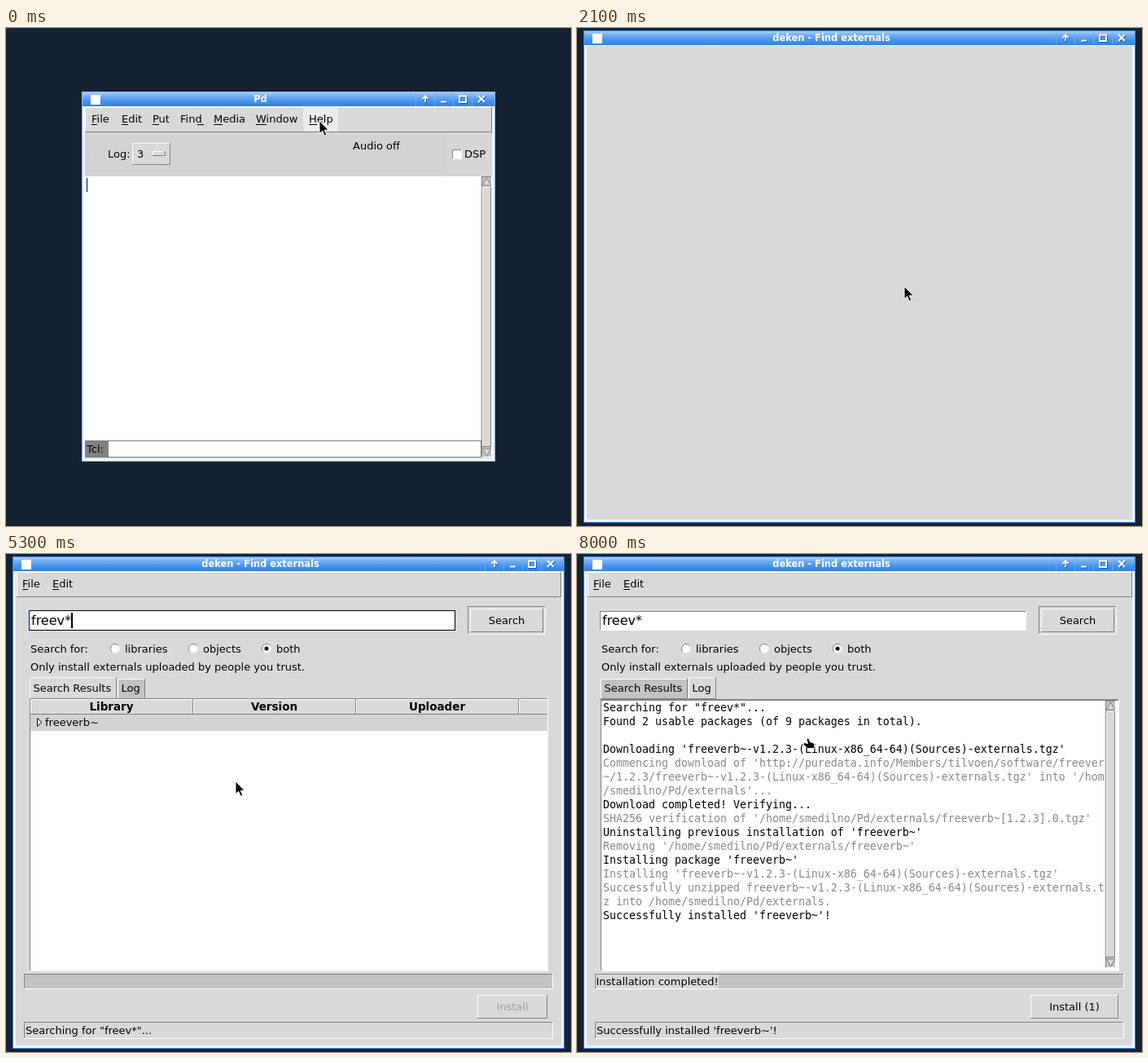
Write an HTML page that moves like this. It is 694 px wide and 611 px high and loops after 9400 ms.

```html
<!DOCTYPE html>
<html lang="en">
<head>
<meta charset="utf-8">
<title>Find externals</title>
<style>
html, body { margin: 0; width: 100%; height: 100%; overflow: hidden; background: #152233; }
svg { display: block; }
rect, .crisp { shape-rendering: crispEdges; }
text { font: 13px "DejaVu Sans", sans-serif; white-space: pre; }
text.bold { font-weight: bold; font-size: 13.5px; }
text.title { font-weight: bold; font-size: 11.45px; }
text.mono { font: 13.29px "DejaVu Sans Mono", monospace; }
text.entry { font-size: 16px; }
</style>
</head>
<body>
<svg id="stage" width="694" height="611" viewBox="0 0 694 611">
  <defs>
    <linearGradient id="bar" x2="0" y2="1">
      <stop offset="0" stop-color="#a9cef8"/>
      <stop offset=".3" stop-color="#6eacf3"/>
      <stop offset=".6" stop-color="#4c94ec"/>
      <stop offset="1" stop-color="#3381e3"/>
    </linearGradient>
  </defs>
  <g id="scene"></g>
</svg>
<script>
const LOOP = 9400, STEP = 100;
const BG = '#d9d9d9', TROUGH = '#c3c3c3', DARK = '#828282', GREY = '#888', LIT = '#ececec';
const scene = document.getElementById('scene');

// ---- drawing helpers ----
const esc = s => s.replace(/&/g, '&amp;').replace(/</g, '&lt;');
const box = (x, y, w, h, fill) =>
  `<rect x="${x}" y="${y}" width="${w}" height="${h}" fill="${fill}"/>`;
const text = (x, y, s, fill = '#000', cls = '', anchor = 'start') =>
  `<text x="${x}" y="${y}" fill="${fill}" class="${cls}" text-anchor="${anchor}">${esc(s)}</text>`;
const path = (d, fill, stroke = 'none', width = 1, extra = '') =>
  `<path d="${d}" fill="${fill}" stroke="${stroke}" stroke-width="${width}" ${extra}/>`;
const clip = (x, y, w, h, body) =>
  `<svg x="${x}" y="${y}" width="${w}" height="${h}" viewBox="${x} ${y} ${w} ${h}">${body}</svg>`;

function bevel(x, y, w, h, fill, sunken = false) {
  const [a, b] = sunken ? [DARK, '#fff'] : ['#fff', DARK];
  return box(x, y, w, h, b) + box(x, y, w - 1, h - 1, a) + box(x + 1, y + 1, w - 2, h - 2, fill);
}

function button(x, y, w, h, label, fill = '#000') {
  return bevel(x, y, w, h, BG) + text(x + w / 2, y + h / 2 + 4.5, label, fill, '', 'middle');
}

function menuLabel(x, y, s, key, keyWidth) {
  const before = { 0: 0, 3: 21.3 }[key];
  return text(x, y, s) + box(x + before, y + 2, keyWidth, 1, '#000');
}

function scrollbar(x, y, w, h) {
  const m = x + w / 2, b = y + h;
  return bevel(x, y, w, h, TROUGH, true) +
    path(`M${m} ${y + 2}L${x + w - 1.5} ${y + 11}H${x + 1.5}Z`, BG, DARK) +
    bevel(x + 1, y + 13, w - 2, h - 26, BG) +
    path(`M${m} ${b - 2}L${x + w - 1.5} ${b - 11}H${x + 1.5}Z`, BG, DARK);
}

function frame(x, y, w, h, title, edge) {
  const cy = y + 9, r = x + w;
  const icon = (d, o) => path(d, 'none', '#1c5cb4', 2, `transform="translate(${o + 1} ${cy + 1})"`) +
    path(d, 'none', '#fff', 2, `transform="translate(${o} ${cy})"`);
  const seps = [98, 75, 52, 29].map(d => box(r - d, y + 2, 1, 15, '#72acf0')).join('');
  return box(x, y, w, h, edge) + box(x + 1, y + 1, w - 2, h - 2, '#f2f5fa') +
    box(x + 1, y + 1, w - 2, 17, 'url(#bar)') +
    box(x + 4, y + 19, w - 8, h - 23, BG) + seps +
    box(x + 11, y + 4, 12, 12, '#fff') +
    text(x + w / 2 - 34.5, cy + 4, title, '#fff', 'title', 'middle') +
    icon('M0 4V-3M-3.5 0L0 -3.5L3.5 0', r - 86) +
    icon('M-4 3.5H3', r - 63) +
    icon('M-4 -3.5H4V4H-4Z', r - 40) +
    icon('M-4 -4L4 4M4 -4L-4 4', r - 17);
}

const arrow = (x, y) => path('M0 0V15.5L3.6 12.2L6.2 18.2L8.8 17L6.2 11.3H11.2Z', '#000', '#fff', 1,
  `transform="translate(${x} ${y})"`);
const hand = (x, y) => path('M-1 1.2Q.5 -.8 2 1L3.2 4.8L7.6 5.8L8.5 8V12.5H0L-5 7.4L-3.8 5.4L.6 6.8Z',
  '#000', '#fff', .8, `transform="translate(${x} ${y})"`) + box(x + 1, y + 12, 7, 1.4, '#fff');

// ---- mouse ----
const moves = [
  [600, 1500, 385, 114, 402, 317],
  [4900, 5900, 403, 317, 53, 206],
  [6300, 6800, 53, 206, 281, 226]
];
function mouse(t) {
  const m = moves.filter(m => t >= m[0]).pop() || moves[0];
  const u = Math.min(1, Math.max(0, (t - m[0]) / (m[1] - m[0])));
  const k = (1 - Math.cos(Math.PI * u)) / 2;
  return { x: Math.round(m[2] + (m[4] - m[2]) * k), y: Math.round(m[3] + (m[5] - m[3]) * k) };
}

// ---- console window ----
const items = [
  ['About Pd', 138], ['HTML Manual...', 160], ['Browser...', 182], ['List of objects...', 204],
  ['puredata.info', 243], ['Check for updates', 265], ['Report a bug', 287],
  ['Find externals', 326], ['Tcl prompt', 365]
];

function helpMenu(my) {
  let s = bevel(365, 127, 200, 251, BG);
  for (const y of [223, 306, 345]) s += box(367, y, 196, 1, DARK) + box(367, y + 1, 196, 1, '#fff');
  for (const [label, y] of items) {
    if (Math.abs(my - y) <= 11) s += bevel(366, y - 10, 198, 22, LIT);
    s += text(387, y + 5, label);
  }
  return s + text(518, 187, 'Ctrl+B') + path('M376 366L378.5 369L383 363.5', 'none', '#000', 2);
}

function consoleWindow(t, m) {
  const open = t >= 400 && t < 1700;
  let s = frame(93, 78, 508, 454, 'Pd', '#8dbbf2');
  s += bevel(97, 97, 500, 31, BG);
  if (t < 400) s += box(365, 97, 43, 30, LIT);
  else if (t < 2000) s += bevel(365, 97, 43, 30, LIT);
  s += menuLabel(105, 116, 'File', 0, 7) + menuLabel(142, 116, 'Edit', 0, 8) +
    menuLabel(180, 116, 'Put', 0, 8) + menuLabel(214, 116, 'Find', 3, 8) +
    menuLabel(255, 116, 'Media', 0, 11) + menuLabel(307, 116, 'Window', 0, 13) +
    menuLabel(372, 116, 'Help', 0, 10);
  s += box(97, 128, 500, 54, '#d3d3d3') + box(540, 128, 57, 54, '#d6d6d6') + box(110, 154, 1, 1, GREY);
  s += text(125, 159, 'Log:') + bevel(155, 141, 47, 27, BG) + text(161, 159, '3') + bevel(180, 151, 16, 6, BG);
  s += text(426, 149, 'Audio off') + bevel(548, 149, 12, 12, '#fff', true) + text(563, 159, 'DSP');
  s += box(97, 182, 488, 325, '#fff') + scrollbar(584, 182, 13, 345);
  s += box(97, 506, 488, 1, DARK) + box(97, 507, 28, 20, DARK) + text(99, 521, 'Tcl:') +
    box(125, 506, 459, 21, DARK) + box(126, 507, 457, 19, '#fff');
  if (t < 500) s += box(99, 184, 1, 17, '#000');
  return s + (open ? helpMenu(m.y) : '');
}

// ---- package window ----
const USER = 'tilvoen', OTHER = 'ver42m', ADMIN = 'smedilno';
const TGZ = 'freeverb~-v1.2.3-(Linux-x86_64-64)(Sources)-externals.tgz';
const URL_TEXT = `http://puredata.info/Members/${USER}/software/freeverb~/1.2.3/${TGZ}`;
const DONE = "Successfully installed 'freeverb~'!";
const SEARCH = 'Searching for "freev*"...';

const intro = [
  'Enter an exact library or object name.',
  "        e.g. 'freeverb~'",
  "Use the '*' wildcard to match any number of characters.",
  "        e.g. '*-plugin' will match 'deken-plugin' (and more).",
  'You can restrict the search to only-libraries or only-objects.',
  'To get a list of all available externals, try an empty search.',
  '',
  'Right-clicking a search result will give you more options...',
  '',
  'You can also search for libraries & objects via your web browser:',
  '@https://deken.puredata.info'
];
// a leading # marks a grey line, @ a link
const log = [
  SEARCH,
  'Found 2 usable packages (of 9 packages in total).',
  '',
  `Downloading '${TGZ}'`,
  `#Commencing download of 'http://puredata.info/Members/${USER}/software/freever`,
  `#~/1.2.3/${TGZ}' into '/hom`,
  `#/${ADMIN}/Pd/externals'...`,
  'Download completed! Verifying...',
  `#SHA256 verification of '/home/${ADMIN}/Pd/externals/freeverb~[1.2.3].0.tgz'`,
  "Uninstalling previous installation of 'freeverb~'",
  `#Removing '/home/${ADMIN}/Pd/externals/freeverb~'`,
  "Installing package 'freeverb~'",
  `#Installing '${TGZ}'`,
  '#Successfully unzipped freeverb~-v1.2.3-(Linux-x86_64-64)(Sources)-externals.t',
  `#z into /home/${ADMIN}/Pd/externals.`,
  DONE
];
const rows = [
  ['1.2.3', USER, 2016], ['0.0.extended', OTHER, 2015], ['1.2.3', ADMIN, 2018],
  ['1.2.3', USER, 2016], ['1.2.3', USER, 2016], ['1.2.3', USER, 2016], ['1.2.3', USER, 2016],
  ['0.0.extended', OTHER, 2015], ['0-0extended', ADMIN, 2015]
];
const keys = [3300, 3400, 3500, 3700, 3900, 4200];
const caretAt = [30, 36, 43, 53, 63, 72, 80];

function logPane(lines) {
  const ink = { '#': GREY, '@': '#00f' };
  const body = lines.map((l, i) =>
    text(32, 193 + 17 * i, ink[l[0]] ? l.slice(1) : l, ink[l[0]], 'mono')).join('');
  return bevel(29, 178, 637, 334, '#fff', true) + box(30, 179, 635, 1, GREY) +
    box(648, 180, 16, 330, '#fff') + scrollbar(649, 180, 13, 328) + clip(30, 180, 618, 330, body);
}

function cells(row, y, fill) {
  return row.map((c, i) => text(234 + 200 * i, y, String(c), fill)).join('');
}

function tree(t) {
  const picked = t >= 6000, open = t >= 6100, chosen = t >= 7200;
  let s = box(30, 197, 635, 20, picked ? '#4a6984' : '#d3d3d3');
  s += text(48, 211, 'freeverb~', picked ? '#fff' : '#000');
  s += open ? path('M32.5 207.5H43L37.7 213Z', 'none', '#fff')
            : path('M38.5 201.5V211.5L44 206.5Z', '#fff', '#000');
  if (chosen) s += cells(rows[0], 211, '#fff') + box(30, 217, 635, 20, '#add8e6');
  if (open) rows.forEach((r, i) => s += cells(r, 231 + 20 * i, i < 2 ? '#000' : GREY));
  const heads = ['Library', 'Version', 'Uploader', ''].map((h, i) =>
    bevel(30 + 200 * i, 178, i < 3 ? 200 : 36, 19, BG) +
    text(129.5 + 200 * i, 192, h, '#000', 'bold', 'middle')).join('');
  return bevel(29, 177, 637, 335, '#fff', true) + clip(30, 178, 635, 333, heads + s);
}

function tab(x, w, label, active) {
  const y = active ? 151 : 153;
  return bevel(x, y, w, 178 - y, active ? BG : TROUGH) + text(x + 5, 169, label);
}

function entry(t, n) {
  const w = n ? 524 : 513, focus = t >= 2600 && t < 6000;
  let s;
  if (focus) s = box(28, 69, w, 25, '#000') + box(28, 69, 1, 25, '#00f') + box(29, 70, w - 2, 23, '#fff');
  else s = bevel(28, 69, w, 25, '#fff', true) + box(28, 69, w, 1, BG) + box(29, 70, w - 2, 1, DARK);
  s += text(31, 87, 'freev*'.slice(0, n), '#000', 'entry');
  if (focus && (t - 2600) % 900 < 600) s += box(caretAt[n], 72, 2, 19, '#000');
  return s;
}

function status(t, m) {
  if (t < 4400) return DONE;
  if (t < 7400) return t >= 6400 && m.y >= 217 ? URL_TEXT : SEARCH;
  if (t < 7500) return `Downloading '${TGZ}'`;
  return t < 8000 ? log[7] : DONE;
}

function pane(t) {
  if (t < 4400) return logPane(intro);
  if (t < 4600) return logPane(log.slice(0, t < 4500 ? 1 : 2));
  if (t < 7400) return tree(t);
  return logPane(log.slice(0, t < 7500 ? 7 : t < 8000 ? 9 : log.length));
}

function packageWindow(t, m) {
  let s = frame(8, 3, 678, 604, 'deken - Find externals', '#3f8df0');
  if (t < 2200) return s;
  s += bevel(13, 22, 669, 31, BG) + menuLabel(20, 41, 'File', 0, 7) + menuLabel(57, 41, 'Edit', 0, 8);
  if (t < 2300) return s;
  if (t < 2500) {
    return s + box(28, 69, 513, 25, '#fff') + box(29, 177, 636, 334, '#fff') + box(649, 180, 13, 328, BG);
  }
  const n = keys.filter(k => t >= k).length, bx = n ? 567 : 556;
  const results = t >= 4600 && t < 7400;
  s += entry(t, n) + bevel(bx, 64, 663 - bx, 35, BG, true) +
    button(bx + 3, 67, 657 - bx, 29, n ? 'Search' : 'Show all');
  s += text(30, 121, 'Search for:');
  [[134, 'libraries'], [230, 'objects'], [320, 'both']].forEach(([x, label], i) => {
    s += `<circle cx="${x}" cy="116" r="5.5" fill="#fff"/>` +
      path(`M${x - 4} 120A5.5 5.5 0 0 1 ${x + 4} 112`, 'none', DARK) + text(x + 12, 121, label);
    if (i === 2) s += `<circle cx="${x}" cy="116" r="2.5"/>`;
  });
  s += text(30, 143, 'Only install externals uploaded by people you trust.');
  s += tab(28.5, 107, 'Search Results', results) + tab(136.5, 34.5, 'Log', !results) + pane(t);
  s += bevel(22, 515, 650, 19, TROUGH, true);
  if (t >= 8000) s += box(23, 516, 151, 17, BG) + text(23.5, 529, 'Installation completed!');
  s += t < 7200 ? button(579, 541, 86, 29, 'Install', '#a3a3a3') : button(557, 541, 108, 29, 'Install (1)');
  s += bevel(22, 574, 650, 21, BG, true) + clip(23, 575, 648, 19, text(24, 589, status(t, m)));
  return s;
}

function draw(t) {
  const m = mouse(t);
  const overText = t >= 2200 && t < 4600 || t >= 7400;
  scene.innerHTML = box(0, 0, 694, 611, '#152233') +
    (t < 2100 ? consoleWindow(t, m) : packageWindow(t, m)) +
    (overText ? hand(m.x + (t < 4600 ? 1 : 2), m.y) : arrow(m.x, m.y));
}

let last = -1;
function tick() {
  const t = Math.floor(performance.now() % LOOP / STEP) * STEP;
  if (t !== last) draw(last = t);
  requestAnimationFrame(tick);
}
tick();
</script>
</body>
</html>
```
